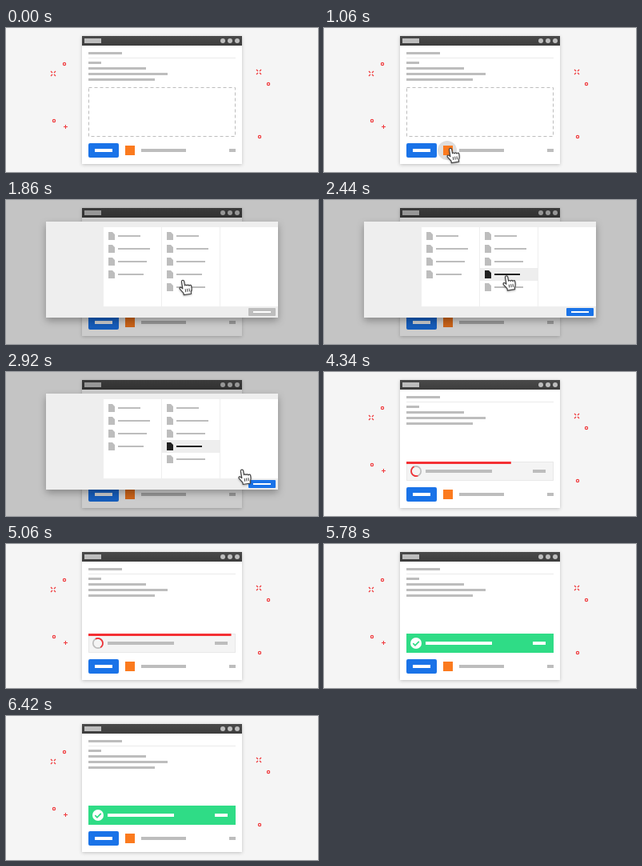
Recreate the animation shown at these times as an HTML page. Size 390x180 px, loop 7500 ms.

```html
<!DOCTYPE html>
<html lang="en">
<head>
<meta charset="utf-8">
<title>Attach a file</title>
<style>
html, body { margin: 0; width: 100%; height: 100%; overflow: hidden; background: #f5f5f5; }
svg { display: block; width: 390px; height: 180px; }
</style>
</head>
<body>
<svg viewBox="0 0 390 180">
  <defs>
    <filter id="soft" x="-20%" y="-20%" width="140%" height="150%">
      <feDropShadow dx="0" dy="1" stdDeviation="2" flood-opacity=".22"/>
    </filter>
    <filter id="deep" x="-20%" y="-20%" width="140%" height="160%">
      <feDropShadow dx="0" dy="4" stdDeviation="5" flood-opacity=".3"/>
    </filter>
    <filter id="small" x="-30%" y="-30%" width="160%" height="170%">
      <feDropShadow dx="0" dy="1" stdDeviation=".8" flood-opacity=".3"/>
    </filter>
    <linearGradient id="title" x2="0" y2="1">
      <stop stop-color="#4a4a4a"/><stop offset="1" stop-color="#3d3d3d"/>
    </linearGradient>
  </defs>
  <rect width="390" height="180" fill="#f5f5f5"/>
  <g id="marks" fill="none" stroke="#f0393c" stroke-width="1.2"></g>

  <rect x="95" y="10" width="200" height="160" fill="#fff" filter="url(#soft)"/>
  <rect x="95" y="10" width="200" height="12" fill="url(#title)"/>
  <g id="lines" fill="#bdbdbd">
    <circle cx="271" cy="16" r="3"/><circle cx="280" cy="16" r="3"/><circle cx="289" cy="16" r="3"/>
  </g>
  <path d="M103 37.5H287" stroke="#ebebeb"/>
  <rect id="drop" x="103.5" y="74.5" width="183" height="61" fill="none" stroke="#bdbdbd" stroke-dasharray="4 3"/>
  <rect x="103" y="144" width="38" height="18" rx="2" fill="#1a73e8"/>
  <rect x="111" y="151" width="22" height="4" fill="#fff"/>
  <circle id="hover" cx="154" cy="153" r="12" fill="#dedede"/>
  <rect x="149" y="147" width="12" height="12" fill="#fb7a1e"/>

  <g id="upload">
    <rect x="103.5" y="112.5" width="183" height="23" fill="#f4f4f4" stroke="#e8e8e8"/>
    <rect id="bar" x="103" y="112" height="3" fill="#f43034"/>
    <circle cx="115" cy="124" r="6.2" fill="none" stroke="#bdbdbd" stroke-width="1.7"/>
    <path id="spin" d="M110.62 119.62A6.2 6.2 0 0 1 119.38 128.38" fill="none" stroke="#f43034" stroke-width="1.7"/>
    <path d="M127 122h83v4h-83zM261 122h16v4h-16z" fill="#bdbdbd"/>
    <g id="done">
      <rect x="103" y="112" width="184" height="24" fill="#2fdc86"/>
      <circle cx="115" cy="124" r="7" fill="#fff"/>
      <path d="M111.3 124.2l2.6 2.6l4.9-5" fill="none" stroke="#2fdc86" stroke-width="1.7"/>
      <path d="M127 122h83v4h-83zM261 122h16v4h-16z" fill="#fff"/>
    </g>
  </g>

  <g id="modal">
    <rect width="390" height="180" opacity=".2"/>
    <rect x="50" y="27" width="290" height="120" fill="#eee" filter="url(#deep)"/>
    <rect x="122" y="34" width="218" height="99" fill="#fff"/>
    <path d="M194.5 34V133M267.5 34V133" stroke="#eee"/>
    <rect id="row" x="195" y="85" width="72" height="16" fill="#eee"/>
    <g id="files" fill="#bdbdbd"></g>
    <rect id="pick" x="303" y="135" width="34" height="10" rx="1"/>
    <rect x="309" y="139" width="22" height="2" fill="#fff"/>
  </g>

  <g id="hand" filter="url(#small)">
    <g transform="rotate(-9)" stroke="#424242" stroke-width="1.2" stroke-linejoin="round" stroke-linecap="round">
      <path fill="#fff" d="M-1.6 .8Q-1.5-.7 0-.7T1.6 .8V6.2Q3-.0 0 0M-1.6 .8V9.6L-3 8Q-4.4 6.9-5.2 8.1Q-5.6 8.9-4.9 9.9L-1.4 15.2V17.6H8V15.2Q9.6 12.9 9.6 10.6V7.8Q9.4 6.6 8.2 6.6Q7.3 6.6 6.9 7.2Q6.4 5.9 5.3 5.9Q4.5 5.9 4.2 6.5Q3.5 5.4 2.6 5.5Q1.9 5.5 1.6 6V.8Q1.5-.7 0-.7T-1.6 .8Z" id="palm"/>
      <path fill="none" stroke-width="1" d="M1.6 10.8V14M4 10.8V14M6.4 10.8V14"/>
    </g>
  </g>
</svg>
<script>
const LOOP = 7500;
const NS = 'http://www.w3.org/2000/svg';
const $ = id => document.getElementById(id);

function add(parent, tag, attrs) {
  const el = document.createElementNS(NS, tag);
  for (const k in attrs) el.setAttribute(k, attrs[k]);
  return parent.appendChild(el);
}
const set = (id, name, value) => $(id).setAttribute(name, value);
const clamp = v => Math.max(0, Math.min(1, v));
const ramp = (t, start, dur) => clamp((t - start) / dur);
const mix = (a, b, k) => a + (b - a) * k;
const tint = (a, b, k) => `rgb(${a.map((v, i) => Math.round(mix(v, b[i], k)))})`;

// cubic-bezier(.25, .1, .25, 1)
function ease(x) {
  if (x <= 0 || x >= 1) return clamp(x);
  let lo = 0, hi = 1, s = x;
  for (let i = 0; i < 24; i++) {
    s = (lo + hi) / 2;
    if (.75 * s * (1 - s) + s ** 3 < x) lo = s; else hi = s;
  }
  return .3 * s * (1 - s) ** 2 + 3 * s * s * (1 - s) + s ** 3;
}

// outline of the pointing hand, tip at the origin
set('palm', 'd', 'M-1.6 .8Q-1.5-.7 0-.7T1.6 .8V6Q1.9 5.5 2.6 5.5Q3.5 5.4 4.2 6.5Q4.5 5.9 5.3 5.9' +
  'Q6.4 5.9 6.9 7.2Q7.3 6.6 8.2 6.6Q9.4 6.6 9.6 7.8V10.6Q9.6 12.9 8 15.2V17.6H-1.4V15.2' +
  'L-4.9 9.9Q-5.6 8.9-5.2 8.1Q-4.4 6.9-3 8L-1.6 9.6Z');

// background ornaments
for (const [cx, cy] of [[73, 45], [60, 116], [328, 70], [317, 136]])
  add($('marks'), 'circle', { cx, cy, r: 1.6 });
for (const [x, y] of [[59, 57], [316, 55]])
  add($('marks'), 'path', {
    d: 'M-3-3l2 2M3-3l-2 2M-3 3l2-2M3 3l-2-2', transform: `translate(${x} ${y})`
  });
add($('marks'), 'path', { d: 'M72 123.5h5M74.5 121v5', 'stroke-width': 1 });

// placeholder text
for (const [x, y, width, height] of [
  [98, 13, 21, 6], [103, 30, 42, 3], [103, 42, 16, 3], [103, 49, 72, 3],
  [103, 56, 99, 3], [103, 63, 83, 3], [169, 151, 56, 4], [279, 151, 8, 4]
]) add($('lines'), 'rect', { x, y, width, height });

// file list
let chosen;
[[128, [28, 40, 36, 32]], [201, [28, 40, 36, 32, 36]]].forEach(([x, widths]) =>
  widths.forEach((w, i) => {
    const y = 40 + 16 * i;
    const file = add($('files'), 'path', {
      d: `M${x} ${y}h5l3 3v7h-8zM${x + 12} ${y + 4}h${w}v2h-${w}z`
    });
    if (x > 200 && i === 3) chosen = file;
  }));

const moves = [
  [60, 176, 155, 158, 151],
  [1240, 158, 151, 228, 95.5],
  [2500, 228, 95.5, 322, 134]
];

function draw(t) {
  const [start, x0, y0, x1, y1] = moves.filter((m, i) => !i || t >= m[0]).pop();
  const k = ease(ramp(t, start, 1000));
  set('hand', 'transform', `translate(${mix(x0, x1, k)} ${mix(y0, y1, k)})`);

  const closed = ramp(t, 3490, 120);
  const open = ease(ramp(t, 1210, 240)) * (1 - closed);
  set('hand', 'opacity', ramp(t, 60, 400) * (1 - closed));
  set('hover', 'opacity', t < 3490 ? ease(ramp(t, 60, 1000)) * (1 - ramp(t, 1210, 240)) : 0);
  set('modal', 'opacity', open);

  const picked = ramp(t, 2240, 160);
  set('row', 'opacity', picked);
  chosen.setAttribute('fill', tint([189, 189, 189], [33, 33, 33], picked));
  set('pick', 'fill', tint([189, 189, 189], [26, 115, 232], picked));

  const uploading = t >= 3490;
  set('drop', 'opacity', uploading ? 0 : 1);
  set('upload', 'opacity', uploading ? 1 : 0);
  set('bar', 'width', 184 * ease(ramp(t, 3500, 2000)));
  set('spin', 'transform', `rotate(${(t - 3500) / 1500 * 360} 115 124)`);
  set('done', 'opacity', ease(ramp(t, 5100, 600)));
}

const t0 = performance.now();
function tick() {
  draw((performance.now() - t0) % LOOP);
  requestAnimationFrame(tick);
}
tick();
</script>
</body>
</html>
```
